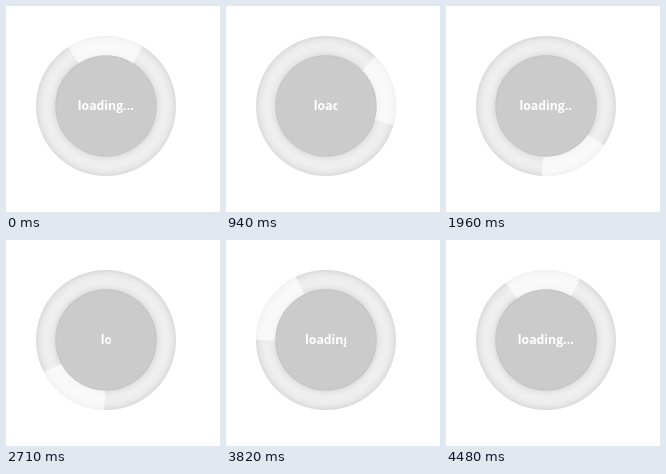
These frames come from a looping animation (214x206 px, 4510 ms). An HTML page with a canvas:

```html
<!DOCTYPE html>
<html lang="en">
<head>
<meta charset="utf-8">
<title>Loading</title>
<style>
  html, body { margin: 0; width: 100%; height: 100%; overflow: hidden; background: #fff; }
  canvas { display: block; width: 214px; height: 206px; }
</style>
</head>
<body>
<canvas id="stage" width="214" height="206"></canvas>
<script>
const ctx = document.getElementById("stage").getContext("2d");
const LOOP = 4510, TYPE_LOOP = LOOP / 2;
const CX = 100, CY = 100, OUTER = 70, INNER = 50.7;
const PIVOT = { x: 102, y: 102.5 };
const HALF_SPAN = 31;
const LABEL = "loading...";
const START = performance.now();

// Angles are in degrees, clockwise from the top.
const rad = deg => (deg - 90) * Math.PI / 180;

function disc(radius, fill) {
  ctx.beginPath();
  ctx.arc(CX, CY, radius, 0, Math.PI * 2);
  ctx.fillStyle = fill;
  ctx.fill();
}

function radial(from, to, stops) {
  const g = ctx.createRadialGradient(CX, CY, from, CX, CY, to);
  stops.forEach(([at, color]) => g.addColorStop(at, color));
  return g;
}

// Lit in the middle, shaded towards both rims.
const ringFill = radial(INNER, OUTER, [
  [0, "#dedede"], [0.12, "#e7e7e7"], [0.3, "#eeeeee"], [0.55, "#efefef"],
  [0.8, "#e8e8e8"], [1, "#dadada"]
]);
const faceFill = radial(INNER - 2, INNER, [[0, "#cbcbcb"], [1, "#c3c3c3"]]);

// The picture advances in 30 ms steps after an opening rest.
const stepTime = t => t < 100 ? 0 : 100 + Math.floor((t - 100) / 30) * 30;

// The wedge turns about a point slightly off the ring's centre.
function drawWedge(center) {
  ctx.save();
  ctx.beginPath();
  ctx.arc(CX, CY, OUTER, 0, Math.PI * 2);
  ctx.clip();
  ctx.beginPath();
  ctx.moveTo(PIVOT.x, PIVOT.y);
  ctx.arc(PIVOT.x, PIVOT.y, OUTER + 10, rad(center - HALF_SPAN), rad(center + HALF_SPAN));
  ctx.closePath();
  ctx.fillStyle = "rgba(255,255,255,.65)";
  ctx.fill();
  ctx.restore();
}

// The label sits in a centred box that widens and clips its right side.
function drawLabel(t) {
  ctx.font = "bold 12.3px 'Open Sans', 'Noto Sans', sans-serif";
  const full = ctx.measureText(LABEL).width;
  const local = t % TYPE_LOOP;
  const shown = local < 100 ? full : full * Math.min(1, (local - 100) / 1980);
  const left = 99.7 - shown / 2;
  ctx.save();
  ctx.beginPath();
  ctx.rect(left, 85, shown, 30);
  ctx.clip();
  ctx.fillStyle = "#fff";
  ctx.fillText(LABEL, left, 103.8);
  ctx.restore();
}

function draw(now) {
  const t = stepTime(Math.max(0, now - START) % LOOP);
  ctx.fillStyle = "#fff";
  ctx.fillRect(0, 0, 214, 206);
  disc(OUTER, ringFill);
  drawWedge(-2 + 360 * t / LOOP);
  disc(INNER, faceFill);
  drawLabel(t);
  requestAnimationFrame(draw);
}

draw(START);
</script>
</body>
</html>
```
